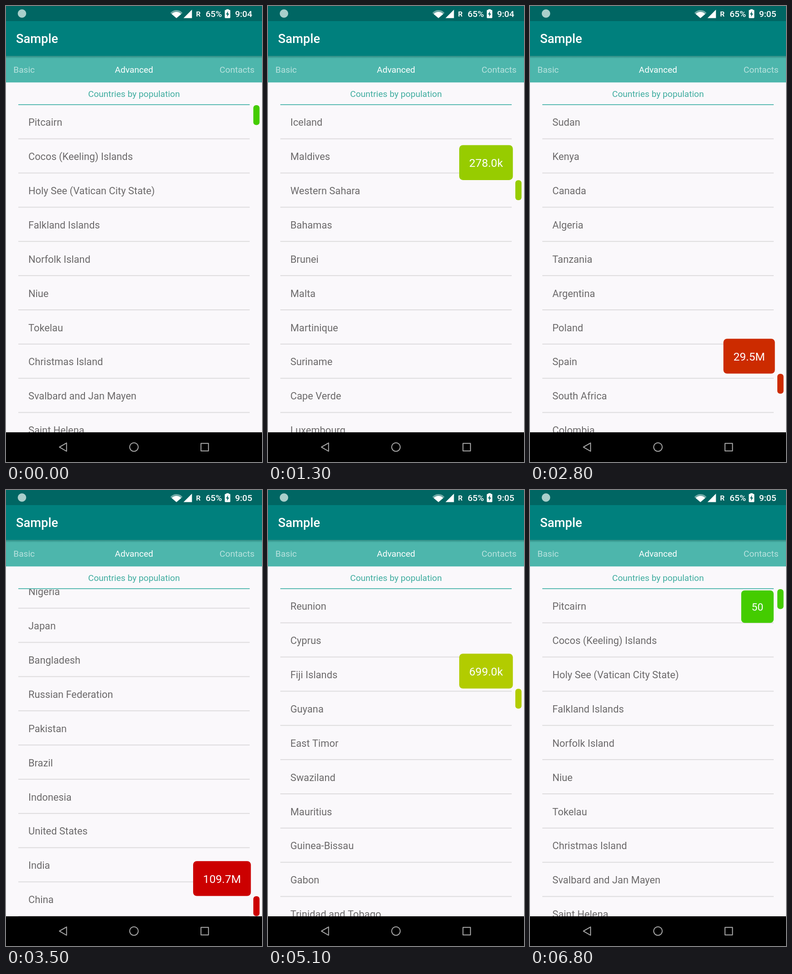
Write an HTML page with a canvas that moves like this. It is 561x998 px and loops after 6900 ms.

```html
<!DOCTYPE html>
<html lang="en">
<head>
<meta charset="utf-8">
<title>Countries by population</title>
<style>
  html, body { margin: 0; width: 100%; height: 100%; overflow: hidden; background: #000; }
  canvas { display: block; width: 561px; height: 998px; }
</style>
</head>
<body>
<canvas id="stage" width="561" height="998"></canvas>
<script>
const ctx = document.getElementById('stage').getContext('2d');
const W = 561, LOOP = 6900, STEP = 100;
const LIST_TOP = 216.3, LIST_BOTTOM = 933, ROW = 74.87;
const THUMB_TOP = 217, THUMB_H = 43.6, TRAVEL = 672, BUBBLE = 76.4;

// Ordered from the smallest population to the largest
const countries = `Pitcairn|Cocos (Keeling) Islands|Holy See (Vatican City State)|Falkland Islands|Norfolk Island|Niue|Tokelau|Christmas Island|Svalbard and Jan Mayen|Saint Helena
Saint Pierre and Miquelon|Anguilla|Montserrat|Nauru|Tuvalu|Wallis and Futuna|Turks and Caicos Islands|Palau|Cook Islands|British Virgin Islands
Gibraltar|San Marino|Liechtenstein|Monaco|Cayman Islands|Saint Kitts and Nevis|Faroe Islands|Greenland|Marshall Islands|Bermuda
American Samoa|Antigua and Barbuda|Dominica|Seychelles|Northern Mariana Islands|Andorra|Kiribati|Virgin Islands, U.S.|Grenada|Tonga
Aruba|Saint Vincent and the Grenadines|Micronesia, Federated States of|Sao Tome and Principe|Mayotte|Saint Lucia|Guam|Samoa|French Guiana|Vanuatu
New Caledonia|Netherlands Antilles|French Polynesia|Belize|Barbados|Iceland|Maldives|Western Sahara|Bahamas|Brunei
Malta|Martinique|Suriname|Cape Verde|Luxembourg|Solomon Islands|Equatorial Guinea|Guadeloupe|Macao|Comoros
Qatar|Bahrain|Djibouti|Reunion|Cyprus|Fiji Islands|Guyana|East Timor|Swaziland|Mauritius
Guinea-Bissau|Gabon|Trinidad and Tobago|Gambia|Estonia|Botswana|Namibia|Kuwait|Slovenia|Macedonia
Bhutan|Lesotho|Latvia|United Arab Emirates|Oman|Jamaica|Mongolia|Mauritania|Panama|Congo
Palestine|Liberia|Lebanon|Uruguay|Albania|Armenia|Singapore|Central African Republic|Lithuania|Ireland
New Zealand|Puerto Rico|Bosnia and Herzegovina|Costa Rica|Eritrea|Moldova|Turkmenistan|Croatia|Norway|Togo
Kyrgyzstan|Papua New Guinea|Sierra Leone|Georgia|Nicaragua|Jordan|Finland|Denmark|Slovakia|Laos
Paraguay|Libyan Arab Jamahiriya|Benin|Tajikistan|Israel|El Salvador|Honduras|Burundi|Hong Kong|Switzerland
Guinea|Chad|Rwanda|Azerbaijan|Austria|Bulgaria|Haiti|Bolivia|Dominican Republic|Sweden
Zambia|Senegal|Tunisia|Portugal|Hungary|Somalia|Belarus|Belgium|Czech Republic|Greece
Yugoslavia|Niger|South Sudan|Malawi|Cambodia|Cuba|Mali|Guatemala|Zimbabwe|Burkina Faso
Ecuador|Angola|Ivory Coast|Cameroon|Chile|Netherlands|Madagascar|Syria|Kazakstan|Yemen
Sri Lanka|Australia|Mozambique|Ghana|Saudi Arabia|Uganda|Malaysia|Taiwan|Romania|Afghanistan
Iraq|Nepal|North Korea|Venezuela|Uzbekistan|Peru|Morocco|Sudan|Kenya|Canada
Algeria|Tanzania|Argentina|Poland|Spain|South Africa|Colombia|Myanmar|South Korea|England
Ukraine|The Democratic Republic of Congo|Italy|France|United Kingdom|Thailand|Ethiopia|Turkey|Iran|Egypt
Philippines|Vietnam|Germany|Mexico|Nigeria|Japan|Bangladesh|Russian Federation|Pakistan|Brazil
Indonesia|United States|India|China`.split(/[|\n]/);

// [row, population], geometric in between
const census = [[0, 50], [1, 600], [2, 1e3], [3, 2e3], [6, 2e3], [9, 6e3], [12, 11e3],
  [19, 21e3], [28, 64e3], [39, 99e3], [51, 217e3], [60, 380e3], [73, 699e3], [78, 1.008e6],
  [88, 1.988e6], [102, 3.282e6], [111, 3.869e6], [126, 5.17e6], [140, 7.43e6],
  [154, 10.04e6], [170, 12.646e6], [179, 18.11e6], [197, 29.49e6], [206, 42.3e6],
  [215, 61.4e6], [222, 82.2e6], [225, 126.7e6], [233, 1277e6]];

// [ms, thumb offset]
const drag = [[0, 0], [150, 0], [700, 57], [1900, 305], [2800, 588], [3250, TRAVEL],
  [3550, TRAVEL], [4200, 509], [5100, 218], [5600, 105], [6600, 0], [LOOP, 0]];

function segment(points, x) {
  let i = 0;
  while (i < points.length - 2 && x >= points[i + 1][0]) i++;
  return i;
}

const slope = i => (drag[i + 1][1] - drag[i][1]) / (drag[i + 1][0] - drag[i][0]);

function tangent(i) {
  if (i === 0 || i === drag.length - 1) return 0;
  const a = slope(i - 1), b = slope(i);
  return a * b > 0 ? 2 * a * b / (a + b) : 0;
}

// Monotone cubic through the drag points
function thumbOffset(t) {
  const i = segment(drag, t), [t0, y0] = drag[i], [t1, y1] = drag[i + 1];
  const h = t1 - t0, u = (t - t0) / h, v = 1 - u;
  return v * v * (1 + 2 * u) * y0 + u * u * (3 - 2 * u) * y1
    + h * u * v * (v * tangent(i) - u * tangent(i + 1));
}

function population(row) {
  const i = segment(census, row), [r0, p0] = census[i], [r1, p1] = census[i + 1];
  return p0 * Math.pow(p1 / p0, (row - r0) / (r1 - r0));
}

function shortNumber(n) {
  if (n < 999) return String(Math.round(n));
  if (n < 999500) return Math.round(n / 1e3).toFixed(1) + 'k';
  return (n / 1e6).toFixed(1) + 'M';
}

function rect(x, y, w, h, color) {
  ctx.fillStyle = color;
  ctx.fillRect(x, y, w, h);
}

function pill(x, y, w, h, r, color) {
  ctx.fillStyle = color;
  ctx.beginPath();
  ctx.roundRect(x, y, w, h, r);
  ctx.fill();
}

function polygon(points) {
  ctx.beginPath();
  points.forEach(([x, y]) => ctx.lineTo(x, y));
  ctx.closePath();
}

function text(str, x, y, size, color, align = 'left', weight = 400) {
  ctx.font = `${weight} ${size}px Roboto, sans-serif`;
  ctx.textAlign = align;
  ctx.fillStyle = color;
  ctx.fillText(str, x, y);
}

function fan(r, color) {
  ctx.fillStyle = color;
  ctx.beginPath();
  ctx.moveTo(373.5, 26.5);
  ctx.arc(373.5, 26.5, r, -Math.PI * 0.75 - 0.08, -Math.PI * 0.25 + 0.08);
  ctx.fill();
}

function statusBar(t) {
  rect(0, 0, W, 33, '#006663');
  ctx.fillStyle = '#a9cfcb';
  ctx.beginPath();
  ctx.arc(35, 16.5, 9.3, 0, 7);
  ctx.fill();
  fan(17.5, '#6fa9a6');
  fan(13.5, '#fff');
  polygon([[389, 26.5], [407.5, 26.5], [407.5, 8]]);
  ctx.fill();
  text('R', 416.5, 22.5, 15.5, '#fff', 'left', 700);
  text('65%', 437.5, 24, 19.1, '#fff', 'left', 500);
  rect(483, 7, 5, 3, '#fff');
  pill(479.5, 8.5, 12, 18, 1.5, '#fff');
  ctx.fillStyle = '#006663';
  polygon([[486.7, 11], [482, 18.5], [485, 18.5], [484.3, 24], [489, 16.5], [486, 16.5]]);
  ctx.fill();
  text(t < 2500 ? '9:04' : '9:05', 539.5, 24, 19.1, '#fff', 'right', 500);
}

function header() {
  rect(0, 109, W, 58.3, '#4db6ac');
  const shade = ctx.createLinearGradient(0, 109, 0, 115);
  shade.addColorStop(0, 'rgba(0,70,66,.4)');
  shade.addColorStop(1, 'rgba(0,70,66,0)');
  rect(0, 109, W, 6, shade);
  rect(0, 32.7, W, 76.4, '#00807d');
  text('Sample', 22, 81.3, 27.3, '#fff', 'left', 500);
  text('Basic', 16.3, 146, 19.1, '#b8e2de');
  text('Advanced', 280.5, 146, 19.1, '#fff', 'center');
  text('Contacts', 544.7, 146, 19.1, '#b8e2de', 'right');
  text('Countries by population', 280.5, 198.8, 19.1, '#40ada0', 'center');
  rect(27, 215, 507, 1.8, '#4db6ac');
}

function list(scroll) {
  ctx.save();
  ctx.beginPath();
  ctx.rect(0, LIST_TOP + 0.5, W, LIST_BOTTOM - LIST_TOP - 0.5);
  ctx.clip();
  const first = Math.floor(scroll);
  for (let i = first; i < first + 11 && i < countries.length; i++) {
    const y = LIST_TOP + (i - scroll) * ROW;
    text(countries[i], 49, y + 46, 21.8, '#6c6a6b');
    rect(27, y + 73.4, 507, 1.9, '#dddbdd');
  }
  ctx.restore();
}

function bubble(label, y, color, scale) {
  ctx.font = '400 24.5px Roboto, sans-serif';
  const w = Math.max(BUBBLE, ctx.measureText(label).width + 43.6);
  ctx.save();
  ctx.translate(536.6 - w / 2, y + BUBBLE / 2);
  ctx.scale(scale, scale);
  pill(-w / 2, -BUBBLE / 2, w, BUBBLE, 8, color);
  text(label, 0, 9.8, 24.5, '#fff', 'center');
  ctx.restore();
}

function navBar() {
  rect(0, LIST_BOTTOM, W, 65, '#000');
  ctx.strokeStyle = '#a9a9a9';
  ctx.lineWidth = 2;
  ctx.lineJoin = 'round';
  polygon([[117, 965.3], [132.7, 956.3], [132.7, 974.5]]);
  ctx.stroke();
  ctx.beginPath();
  ctx.arc(280.4, 965.3, 9.4, 0, 7);
  ctx.stroke();
  ctx.strokeRect(427.3, 957.3, 16.4, 16.4);
}

function draw(t) {
  const offset = thumbOffset(t);
  const maxScroll = countries.length - (LIST_BOTTOM - LIST_TOP) / ROW;
  const scroll = Math.min(Math.round(offset / 2.988), maxScroll);
  const color = `hsl(${100 * (1 - offset / TRAVEL)}, 100%, 40%)`;
  const y = THUMB_TOP + offset;

  rect(0, 0, W, 998, '#faf8fb');
  header();
  statusBar(t);
  list(scroll);
  pill(542, y, 13.6, THUMB_H, 6, color);
  const scale = t < 100 ? 0 : t < 200 ? 0.75 : t < 6800 ? 1 : 0.93;
  if (scale) {
    const label = shortNumber(population(Math.floor(scroll)));
    bubble(label, Math.max(THUMB_TOP, y - BUBBLE - 0.4), color, scale);
  }
  navBar();
}

function tick() {
  const t = performance.now() % LOOP;
  draw(Math.floor(t / STEP) * STEP);
  requestAnimationFrame(tick);
}
tick();
</script>
</body>
</html>
```
